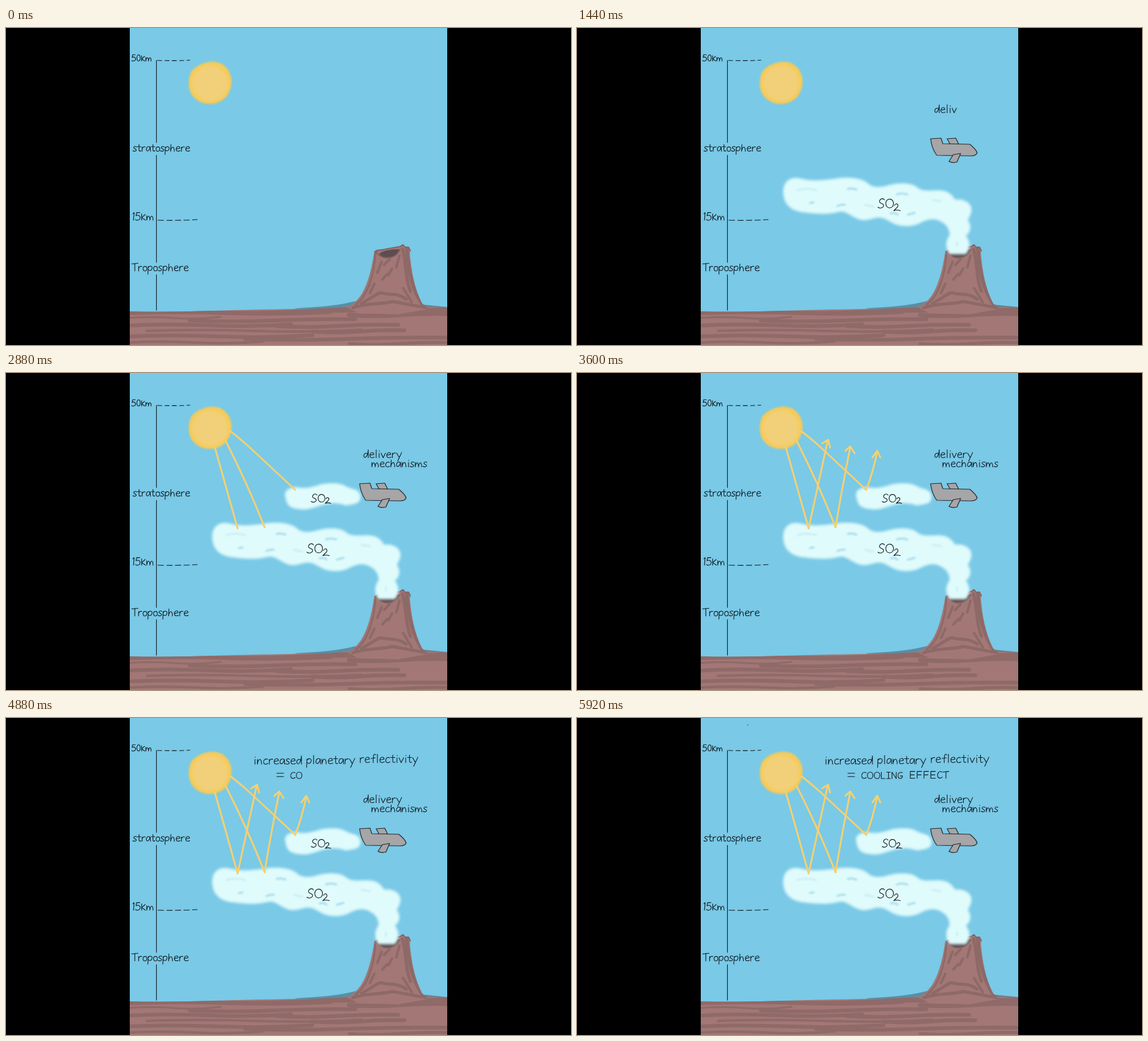
Recreate the animation shown at these times as an HTML page. Size 922x518 px, loop 6 s.

```html
<!DOCTYPE html>
<html lang="en">
<head>
<meta charset="utf-8">
<title>Stratospheric aerosols</title>
<style>
  html, body { margin: 0; width: 100%; height: 100%; overflow: hidden; background: #000; }
  svg { display: block; width: 100vw; height: 100vh; }
  .ink path { fill: none; stroke: #111b20; stroke-width: 1.1; stroke-linecap: round; stroke-linejoin: round; vector-effect: non-scaling-stroke; }
  .rays { fill: none; stroke: #f4d071; stroke-width: 3; stroke-linecap: round; stroke-linejoin: round; }
  .smoke { fill: #e0fbfb; stroke: #d3f4f8; stroke-width: 1.5; filter: url(#soft); }
  .gap { fill: none; stroke: #a5daec; stroke-width: 3; stroke-linecap: round; filter: url(#softer); }
  .shade { fill: none; stroke: #7c5f5d; stroke-linecap: round; stroke-linejoin: round; }
</style>
</head>
<body>
<svg viewBox="0 0 922 518">
  <defs>
    <filter id="soft" x="-20%" y="-20%" width="140%" height="140%"><feGaussianBlur stdDeviation="2.3"/></filter>
    <filter id="softer" x="-50%" y="-300%" width="200%" height="700%"><feGaussianBlur stdDeviation="1.5"/></filter>
    <filter id="edge" x="-20%" y="-20%" width="140%" height="140%"><feGaussianBlur stdDeviation="1.5"/></filter>
    <clipPath id="stage"><path d="M202 0H720V518H202Z"/></clipPath>
    <clipPath id="land"><use href="#ground"/></clipPath>
    <clipPath id="cone"><use href="#volcano"/></clipPath>
  </defs>
  <rect width="922" height="518"/>
  <g clip-path="url(#stage)">
    <rect x="202" width="518" height="518" fill="#79c9e7"/>

    <g id="sun">
      <path filter="url(#edge)" fill="#f7cb57" d="M335 55C348 54 359 61 364 71C370 82 369 96 363 107C357 118 345 124 333 124C320 124 308 118 302 107C297 97 297 83 302 72C307 63 322 56 335 55Z"/>
      <circle filter="url(#soft)" cx="333" cy="90" r="29" fill="#f2d07a"/>
    </g>

    <path d="M470 458C510 456 540 454 572 446L582 456L500 463Z" fill="#5a8ea3"/>
    <path d="M680 452L720 456V460H684Z" fill="#6b7f8b"/>
    <path id="ground" fill="#a27775" d="M202 463Q250 464 300 463Q400 460 480 459Q530 459 575 453L684 455L720 457V518H202Z"/>
    <g id="streaks" class="shade" clip-path="url(#land)" opacity=".5"></g>

    <path id="volcano" fill="#a27775" d="M556 456C582 447 594 412 601 365L605 362L620 361L643 357L648 354L651 358L657 358L660 363L659 369C662 398 666 425 679 450L690 459L640 468L575 466Z"/>
    <g class="shade" clip-path="url(#cone)" opacity=".55">
      <path stroke-width="6" d="M654 359C656 395 662 428 682 455"/>
      <path stroke-width="5" d="M647 361C654 385 651 410 660 430"/>
      <path stroke-width="3" d="M603 366C601 405 589 440 570 452"/>
      <path stroke-width="4" d="M613 382L606 400M626 378L617 387M642 372L637 391M622 402L614 411M630 393L624 404M601 418L594 433M648 425L662 448"/>
      <path stroke-width="5" d="M580 450C600 440 607 431 614 433C622 437 637 431 653 443M566 457C590 449 612 452 630 447C651 450 665 454 688 457"/>
    </g>
    <path fill="#5d4d50" d="M609 369C615 363 631 361 643 362C640 369 636 374 627 374C619 376 612 374 609 369Z"/>
    <path class="shade" stroke-width="1.6" d="M602 365L620 361L643 357L648 354L651 358L657 358L660 364M604 366C612 379 634 380 643 362"/>

    <g data-from="320" data-to="640">
      <path class="smoke" d="M478 279C477 264 486 258 500 260C518 254 540 251 555 258C565 268 580 264 596 265C608 267 613 276 617 281C634 279 645 288 643 300C642 308 636 312 638 315C645 325 640 335 634 339C642 350 641 362 634 369H609C601 361 602 347 608 340C610 331 604 321 596 317C585 309 572 312 562 317C550 325 530 325 517 319C509 314 504 313 497 311C483 305 478 295 478 279Z"/>
    </g>
    <g data-from="640">
      <path class="smoke" d="M337 270C336 252 347 243 363 246C384 252 404 249 420 247C438 243 462 245 473 253C482 263 497 261 510 257C526 253 546 253 555 261C565 269 578 265 594 266C608 267 613 276 617 281C634 279 645 288 643 300C642 308 636 312 638 315C645 325 640 335 634 339C642 350 641 362 634 369H609C601 361 602 347 608 340C610 331 604 321 596 317C585 309 572 312 562 317C550 325 530 325 517 319C511 316 508 314 502 311C488 305 478 316 463 313C447 309 440 297 427 300C410 305 388 303 373 301C355 300 338 292 337 270Z"/>
      <path class="gap" d="M442 263Q449 261 456 264M522 272Q529 269 539 272M380 286L386 285M425 291Q431 288 437 289M512 303Q519 301 523 305M540 305L551 302"/>
      <path class="gap" stroke-opacity=".4" d="M360 265Q375 260 390 265M580 281L594 283M470 289L484 292M620 350V356"/>
    </g>

    <g data-from="2320" data-to="2480">
      <path class="smoke" d="M518 202C515 188 526 180 540 181C553 180 558 188 568 190Q579 192 578 203Q578 215 564 215C550 216 522 219 518 202Z"/>
    </g>
    <g data-from="2480">
      <path class="smoke" d="M457 205C453 193 460 188 474 187C490 191 505 185 516 182C530 180 546 179 555 186C563 191 577 188 578 203C578 215 564 214 555 216C540 211 526 212 517 215C502 219 494 224 479 222C464 221 459 216 457 205Z"/>
    </g>

    <g data-from="960" fill="#a6a5a7" stroke="#25282b" stroke-width="1.2" stroke-linejoin="round">
      <path d="M604 181L618 180L623 190H609Z"/>
      <path d="M577 181L594 180L597 189L641 190Q651 198 653 204Q651 209 643 209L587 208Q579 197 577 181Z"/>
      <path d="M614 207L626 205L620 219Q613 221 607 218Z"/>
    </g>

    <path class="rays" data-from="2880" d="M341 122L378 254M359 112Q394 181 422 252M366 95Q384 109 396 120L472 191"/>
    <path class="rays" data-from="3280" d="M378 254L409 111M400 115L410 109L413 122M422 252Q433 185 446 121M438 127L446 120L453 131M472 191Q483 163 490 128M482 138L490 127L495 138"/>

    <g id="lettering" class="ink">
      <path d="M245.500 53V187M245.500 208V383M245.500 403V461"/>
      <path stroke-dasharray="7 5" d="M247 53Q275 54 300 52.500"/>
      <path stroke-dasharray="9 5" d="M248 314Q282 315 312 313"/>
    </g>
    <circle data-from="5920" cx="278.500" cy="11.500" r=".8" fill="#25414d"/>
  </g>
</svg>
<script>
const LOOP = 6000, TICK = 80;
const NS = "http://www.w3.org/2000/svg";

// Single-stroke handwriting: advance width and pen path, baseline at y = 0.
const glyphs = {
  a: [8.5, "M7-6C4-10 0-6 1-2C2 1 6-1 7-7L7.500 0"],
  c: [8, "M6.500-7C3-9 0-5 1-2C2 1 5 0 7-1"],
  d: [9, "M7-5C5-9 0-6 1-2C2 2 7-2 7.500-12L7.500 0"],
  e: [8.5, "M1-4L7-5C7-9 2-9 1-4C1 1 5 0 7.500-1"],
  f: [8, "M7.500-11C5-14 4-10 4-5V0M1-6L7-7"],
  h: [9, "M1.500-11L1 0C2-8 7-10 7 0"],
  i: [4.5, "M2-7V0M2.300-10.500V-10"],
  k: [8, "M1-10V0M6.500-9L1-4L7 0"],
  l: [4.5, "M2-12V0"],
  m: [13, "M1-7V0C2-8 6-9 6 0C7-8 11-9 11 0"],
  n: [9, "M1-7V0C2-8 7-10 7 0"],
  o: [8, "M4-7C0-8 0 0 3.500 0C8 0 8-8 4-7"],
  p: [8.5, "M1-7L.5 5M1-5C3-9 8-8 7-4C6 0 3 0 1-2"],
  r: [7, "M1-7V0M1-4C2-7 4-8 6-7"],
  s: [7, "M6-7C4-9 0-7 2-5L5-3C7-1 3 1 0-1"],
  t: [7, "M3-11V-2C3 0 5 0 6-1M0-7.500H6"],
  v: [8, "M.5-7L3.500 0L7-7"],
  y: [9, "M.5-7L4-1M8-8L2 5"],
  C: [10.5, "M9-11C3-14 0-8 1-4C2 1 7 0 9-2"],
  O: [13, "M6-12C-1-12-1 0 6 0C13 0 13-12 6-12"],
  L: [10, "M1-12V0H8"],
  I: [10, "M1-12H8M4.500-12V0M1 0H8"],
  N: [11.5, "M1 0V-12L9 0V-12"],
  G: [12, "M9-11C3-14 0-8 1-4C2 1 9 1 9-5H5"],
  E: [12, "M9-12H1V0H9M1-6H8"],
  F: [12, "M9-12H1V0M1-6H8"],
  T: [10, "M0-11L10-12M5-12V0"],
  S: [10, "M9-11C6-15 0-10 3-7L7-5C10-2 4 2 0-1"],
  0: [9, "M4-12C0-11 0 0 4 0C9-1 8-12 4-12"],
  1: [5, "M1-10L3-12L2 0"],
  2: [10, "M1-8C3-13 8-10 6-6L0 0Q5-2 10 0"],
  5: [9, "M7-12H2L1-7C5-9 9-6 7-2C6 0 2 1 0-1"],
  "=": [11, "M0-8H10M0-3H10"]
};

function add(parent, attributes) {
  const path = document.createElementNS(NS, "path");
  for (const name in attributes) path.setAttribute(name, attributes[name]);
  return parent.appendChild(path);
}

const lettering = document.getElementById("lettering");

function write(text, x, y, scale, start = 0, step = 0) {
  [...text].forEach((letter, i) => {
    const [advance, d] = glyphs[letter];
    add(lettering, { d, transform: `translate(${x} ${y}) scale(${scale})`, "data-from": start + i * step });
    x += advance * scale;
  });
}

write("50km", 205, 54, .86);
write("15km", 206, 314, 1.03);
write("stratosphere", 207, 201.5, 1.01);
write("Troposphere", 205, 397, 1.04);
write("SO", 491, 294, 1.2, 800);
write("2", 517, 298.5, 1.05, 800);
write("delivery", 583, 138.5, 1.08, 1120, 80);
write("mechanisms", 596, 153.5, 1.05, 1760, 44);
write("SO", 498, 211, 1.05, 2640);
write("2", 521, 213, .9, 2640);
write("increased", 404, 75.5, 1.14, 3640, 38);
write("planetary", 490, 75, 1.14, 3982, 38);
write("reflectivity", 577, 73, 1.14, 4324, 38);
write("=", 442, 99, 1.1, 4780);
write("COOLING", 464, 99, .87, 4810, 70);
write("EFFECT", 543, 98.5, .93, 5360, 95);

// Long overlapping brush strokes across the ground: x, y, length, width.
const streaks = document.getElementById("streaks");
[
  [200, 466, 330, 6], [330, 464, 260, 6], [500, 462, 220, 8], [560, 469, 160, 7],
  [200, 474, 150, 3], [300, 478, 270, 6], [205, 486, 260, 6], [440, 487, 200, 6],
  [230, 495, 350, 4], [500, 496, 150, 6], [200, 504, 300, 6], [390, 508, 330, 6],
  [200, 514, 220, 4], [560, 516, 160, 5]
].forEach(([x, y, length, width], i) => {
  const bend = i % 2 ? 3 : -3;
  add(streaks, { d: `M${x} ${y}q${length / 4} ${bend} ${length / 2} 0t${length / 2} -2`, "stroke-width": width });
});

const timed = [...document.querySelectorAll("[data-from]")].map(node => ({
  node, from: +node.dataset.from, to: +(node.dataset.to || LOOP)
}));

function draw() {
  const time = Math.floor(performance.now() % LOOP / TICK) * TICK;
  for (const { node, from, to } of timed) {
    node.style.display = time >= from && time < to ? "" : "none";
  }
  requestAnimationFrame(draw);
}
draw();
</script>
</body>
</html>
```
